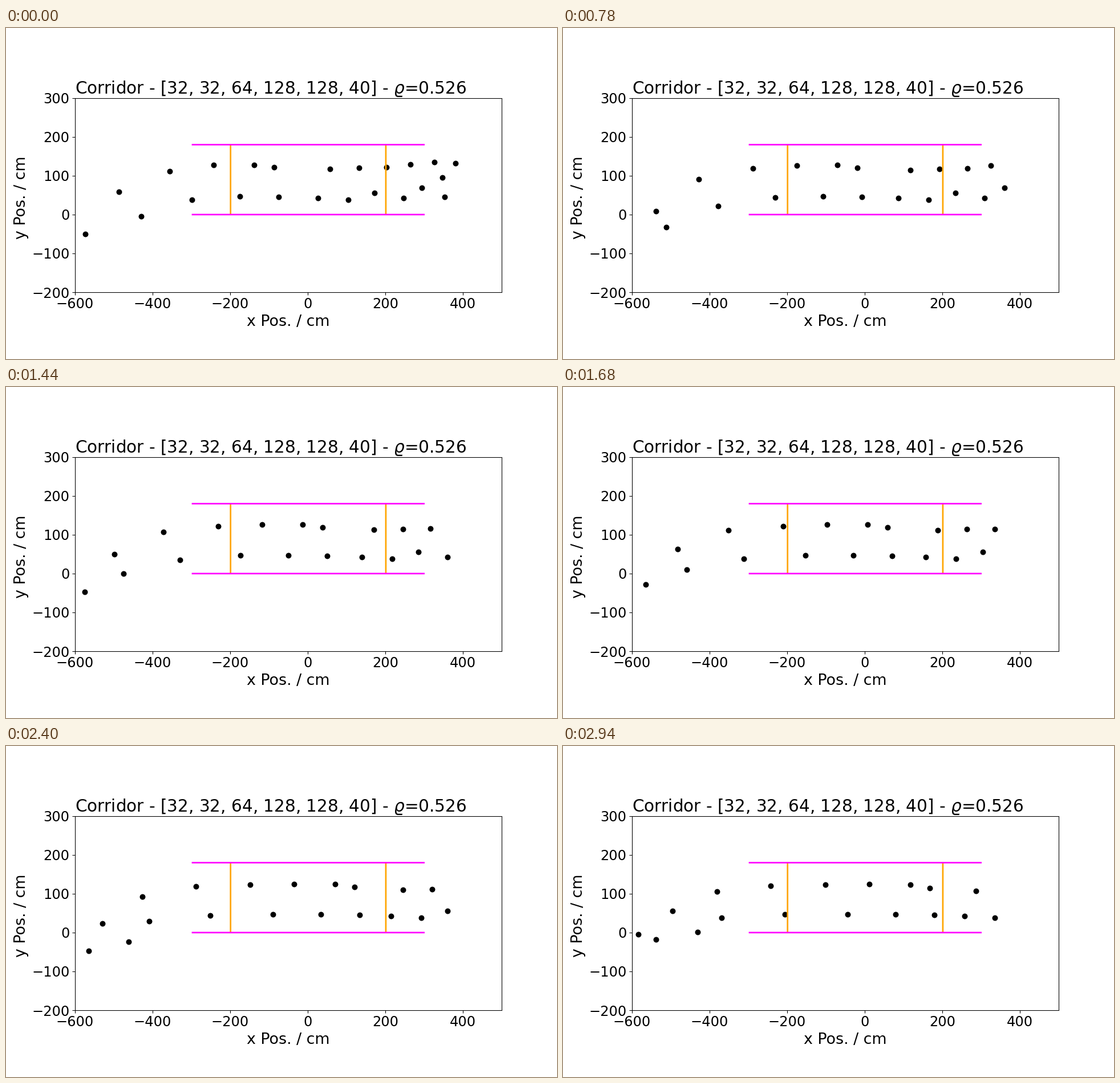
Animation of 966 by 580 pixels, one loop 3 s. Source, as a matplotlib script:

```python
import math

import matplotlib.pyplot as plt
from matplotlib.animation import FuncAnimation
from matplotlib.transforms import ScaledTranslation

W, H, DPI = 966, 580, 96
FRAMES, STEP, SUB = 50, 60, 4
K = 96.6 / DPI  # scale of type and strokes

# Each lane: height it settles at, distance it needs to settle,
# pace while queueing outside, drift towards the middle near the exit (cm).
UPPER = dict(y=125, reach=88, queue=5.25, drift=1.16e-4)
LOWER = dict(y=49, reach=73, queue=4.5, drift=0)

# Where people stand at the start of the loop
UPPER_STARTS = [(-573, -50), (-487, 59), (-356, 112), (-243, 128),
                (-138, 128), (-87, 122), (57, 117), (132, 120),
                (203, 122), (264, 129), (326, 135), (380, 132)]
LOWER_STARTS = [(-429, -5), (-298, 38), (-175, 47), (-75, 45),
                (26, 42), (104, 38), (172, 56), (247, 42),
                (294, 69), (347, 95), (352, 46)]

# People who join later: lane, frame, x, y
ARRIVALS = [(LOWER, 9, -523, -46), (UPPER, 24, -575, -47),
            (LOWER, 32, -485, -51), (LOWER, 39, -567, -51),
            (UPPER, 40, -607, -45)]


def cruise_pace(x):
    """Those in the exit are slowed down, those past it walk freely."""
    if x < 0:
        return 5.2
    return 4.7 if x < 280 else 5.05


def exit_line(n):
    return 389 - 0.66 * n


def walk(lane, first, x, y):
    """Positions by frame, heading for the lane at a steady pace."""
    cruise = cruise_pace(x)
    path = {}
    for n in range(first, FRAMES):
        if x > exit_line(n):
            break
        path[n] = x, y
        for _ in range(SUB):
            slope = (lane["y"] - y) / lane["reach"] if x < -180 else 0
            slope -= lane["drift"] * max(x + 190, 0)
            pace = lane["queue"] if x < -300 else cruise
            dx = pace / SUB / math.hypot(1, slope)
            x, y = x + dx, y + slope * dx
    return path


paths = [walk(UPPER, 0, *p) for p in UPPER_STARTS]
paths += [walk(LOWER, 0, *p) for p in LOWER_STARTS]
paths += [walk(*arrival) for arrival in ARRIVALS]

plt.rcParams["font.family"] = "DejaVu Sans"
fig, ax = plt.subplots(figsize=(W / DPI, H / DPI), dpi=DPI)
ax.set_aspect("equal")
ax.set_xlim(-600, 500)
ax.set_ylim(-200, 300)
ax.set_title(r"Corridor - [32, 32, 64, 128, 128, 40] - $\varrho$=0.526",
             loc="left", fontsize=22 * K, pad=6 * K)
ax.set_xlabel("x Pos. / cm", fontsize=20 * K, labelpad=4 * K)
ax.set_ylabel("y Pos. / cm", fontsize=20 * K, labelpad=4 * K, y=0.487)
ax.tick_params(labelsize=18 * K, length=3.5 * K, width=0.8 * K, pad=3.5 * K)
ax.set_xticks(range(-600, 401, 200))
for spine in ax.spines.values():
    spine.set_linewidth(0.8 * K)

nudge = ax.transData + ScaledTranslation(0.7 / DPI, 0, fig.dpi_scale_trans)
style = dict(lw=2 * K, zorder=3, snap=False, transform=nudge)
ax.vlines([-200, 200], 0, 180, color="orange", **style)
ax.hlines([0, 180], -300, 300, color="magenta", **style)
ax.set_xlim(-600, 500)
ax.set_ylim(-200, 300)
dots = ax.scatter([], [], s=36 * K * K, color="black", lw=1.4 * K, zorder=2)


def update(n):
    dots.set_offsets([path[n] for path in paths if n in path])
    return dots,


anim = FuncAnimation(fig, update, frames=FRAMES, interval=STEP,
                     repeat=True, repeat_delay=0)
plt.show()
```
